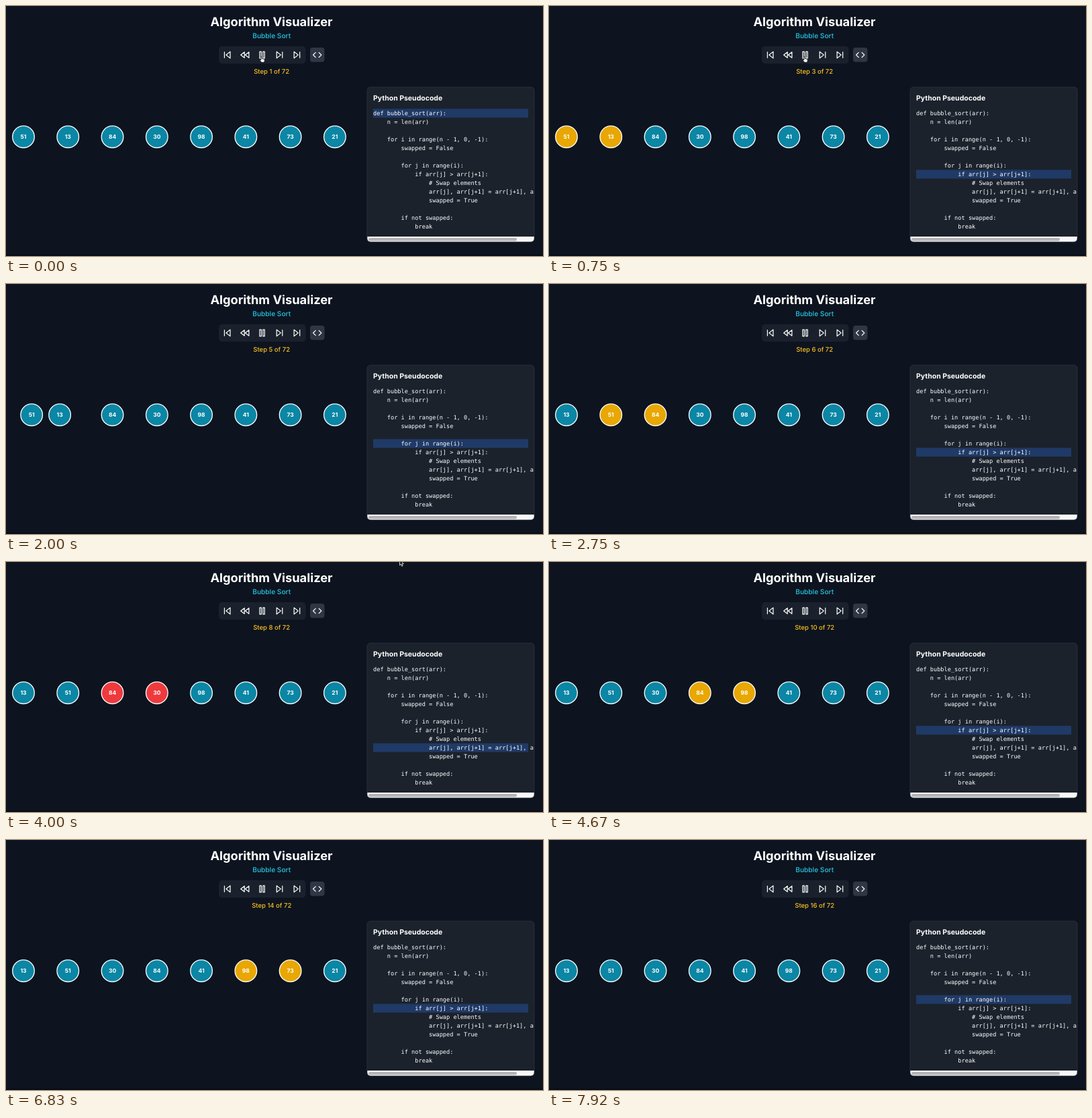
Write an HTML page that moves like this. It is 800 by 373 pixels and loops after 8 s.

```html
<!DOCTYPE html>
<html lang="en">
<head>
<meta charset="utf-8">
<title>Algorithm Visualizer</title>
<style>
  html, body { margin: 0; width: 100%; height: 100%; overflow: hidden; background: #0d141f; }
  svg { display: block; width: 100vw; height: 100vh; }
  text { font-family: Inter, sans-serif; fill: #fff; text-rendering: geometricPrecision; }
  .mid { text-anchor: middle; }
  .title { font-size: 18.3px; font-weight: 700; }
  .subtitle { font-size: 10.2px; font-weight: 500; fill: #27c6e6; }
  .step { font-size: 9.5px; font-weight: 500; fill: #fbbf24; }
  .heading { font-size: 10.5px; font-weight: 700; }
  .code text { font-family: "DejaVu Sans Mono", monospace; font-size: 8.65px; white-space: pre; }
  .node circle { stroke: #fff; stroke-width: 1.3; }
  .node text { font-size: 8.5px; font-weight: 700; }
  .icon { fill: none; stroke: #fff; stroke-width: 2; stroke-linecap: round; stroke-linejoin: round; }
</style>
</head>
<body>
<svg viewBox="0 0 800 373">
  <defs><clipPath id="panelClip"><rect x="538" y="121" width="249" height="231" rx="5"/></clipPath></defs>
  <rect y="371" width="800" height="2" fill="#080c15"/>
  <text class="mid title" x="395.5" y="30">Algorithm Visualizer</text>
  <text class="mid subtitle" x="395.7" y="47.7">Bubble Sort</text>

  <rect x="317" y="60" width="129.5" height="26" rx="5" fill="#1a212c"/>
  <rect x="453" y="62" width="21.5" height="21.5" rx="4" fill="#2f3744"/>
  <g id="icons"></g>
  <text class="mid step" id="step" x="395.7" y="101.3"></text>

  <g id="nodes"></g>

  <g clip-path="url(#panelClip)">
    <rect x="538" y="121" width="249" height="231" fill="#1b222c"/>
    <text class="heading" x="547" y="141.3">Python Pseudocode</text>
    <rect id="highlight" x="547" width="231" height="13" fill="#203a67"/>
    <g class="code" id="code"></g>
    <rect x="538" y="344" width="249" height="8" fill="#f8f8f8"/>
    <rect x="540" y="346" width="221" height="4.4" rx="2.2" fill="#b5b5b5"/>
  </g>
  <rect x="538" y="121" width="249" height="231" rx="5" fill="none" stroke="#303843" stroke-width=".7"/>

  <path id="hand" transform="translate(377.5 75)" fill="#fff" stroke="#111" stroke-width=".7" stroke-linejoin="round"
    d="M2.4 5.6V1.2Q3.2 .2 4 1.2V3.8Q5 3.3 5.4 4.1Q6.4 3.7 6.7 4.5Q7.8 4.3 7.8 5.4L7.2 9H3.2L.6 6Q.7 4.8 2.4 5.6Z"/>
  <path id="arrow" transform="translate(586.5 -3.5)" fill="#111" stroke="#fff" stroke-width=".8" stroke-linejoin="round"
    d="M0 0V8.4L1.9 6.7L3.2 9.8L4.6 9.2L3.3 6.2H5.9Z"/>
</svg>
<script>
const LOOP = 8000, STEP_TIME = 553, LEAD_IN = 390, SWAP_TIME = 500;
const TOTAL_STEPS = 72;
const IDLE = '#0b86a5', COMPARE = '#e8a703', SWAP = '#ef3a3d';
const LINE = { def: 0, outer: 3, inner: 6, compare: 7, swap: 9 };
const values = [51, 13, 84, 30, 98, 41, 73, 21];

const byId = id => document.getElementById(id);
function add(parent, name, attrs, text = '') {
  const el = document.createElementNS('http://www.w3.org/2000/svg', name);
  for (const key in attrs) el.setAttribute(key, attrs[key]);
  el.textContent = text;
  return parent.appendChild(el);
}

const skipForward = 'M5 4L15 12L5 20ZM19 5V19';
[
  [329.7, 'M19 20L9 12L19 4ZM5 19V5'],
  [355.8, 'M11 19L2 12L11 5ZM22 19L13 12L22 5Z'],
  [381.6, 'M6 4H10V20H6ZM14 4H18V20H14Z'],
  [407.5, skipForward],
  [433.4, skipForward],
  [463.7, 'M16 18L22 12L16 6M8 6L2 12L8 18']
].forEach(([x, d]) => add(byId('icons'), 'path',
  { class: 'icon', d, transform: `translate(${x} 73) scale(.61) translate(-12 -12)` }));

`def bubble_sort(arr):
    n = len(arr)

    for i in range(n - 1, 0, -1):
        swapped = False

        for j in range(i):
            if arr[j] > arr[j+1]:
                # Swap elements
                arr[j], arr[j+1] = arr[j+1], arr[j]
                swapped = True

        if not swapped:
            break`.split('\n').forEach((line, i) =>
  add(byId('code'), 'text', { x: 547, y: 163 + 13 * i }, line));

const nodes = values.map(value => {
  const group = add(byId('nodes'), 'g', { class: 'node' });
  const circle = add(group, 'circle', { r: 16.3 });
  add(group, 'text', { class: 'mid', y: 3.1 }, value);
  return { value, group, circle };
});

// First pass of the sort, recorded as steps.
function recordSteps() {
  const order = [...values], steps = [];
  const record = (line, active = [], color = IDLE) =>
    steps.push({ line, active, color, order: [...order] });
  record(LINE.def);
  record(LINE.outer);
  for (let j = 0; j < order.length - 1; j++) {
    const pair = [order[j], order[j + 1]];
    record(LINE.compare, pair, COMPARE);
    if (pair[0] > pair[1]) {
      record(LINE.swap, pair, SWAP);
      [order[j + 1], order[j]] = pair;
      record(LINE.inner);
    }
  }
  return steps;
}
const steps = recordSteps();

const easeInOut = p => p < .5 ? 4 * p ** 3 : 1 - (2 - 2 * p) ** 3 / 2;
const show = (id, visible) => byId(id).setAttribute('visibility', visible ? 'visible' : 'hidden');

function draw(t) {
  const clock = t + LEAD_IN;
  const index = Math.floor(clock / STEP_TIME);
  const step = steps[index], previous = steps[Math.max(0, index - 1)];
  const moved = easeInOut(Math.min(1, (clock - index * STEP_TIME) / SWAP_TIME));

  byId('step').textContent = `Step ${index + 1} of ${TOTAL_STEPS}`;
  byId('highlight').setAttribute('y', 153.5 + 13 * step.line);
  for (const { value, group, circle } of nodes) {
    const from = previous.order.indexOf(value), to = step.order.indexOf(value);
    const x = 26 + 66.27 * (from + (to - from) * moved);
    group.setAttribute('transform', `translate(${x} 195.2)`);
    circle.setAttribute('fill', step.active.includes(value) ? step.color : IDLE);
  }
  show('hand', t < 920);
  show('arrow', t > 3000 && t < 4600);
}

function frame() {
  draw(performance.now() % LOOP);
  requestAnimationFrame(frame);
}
frame();
</script>
</body>
</html>
```
